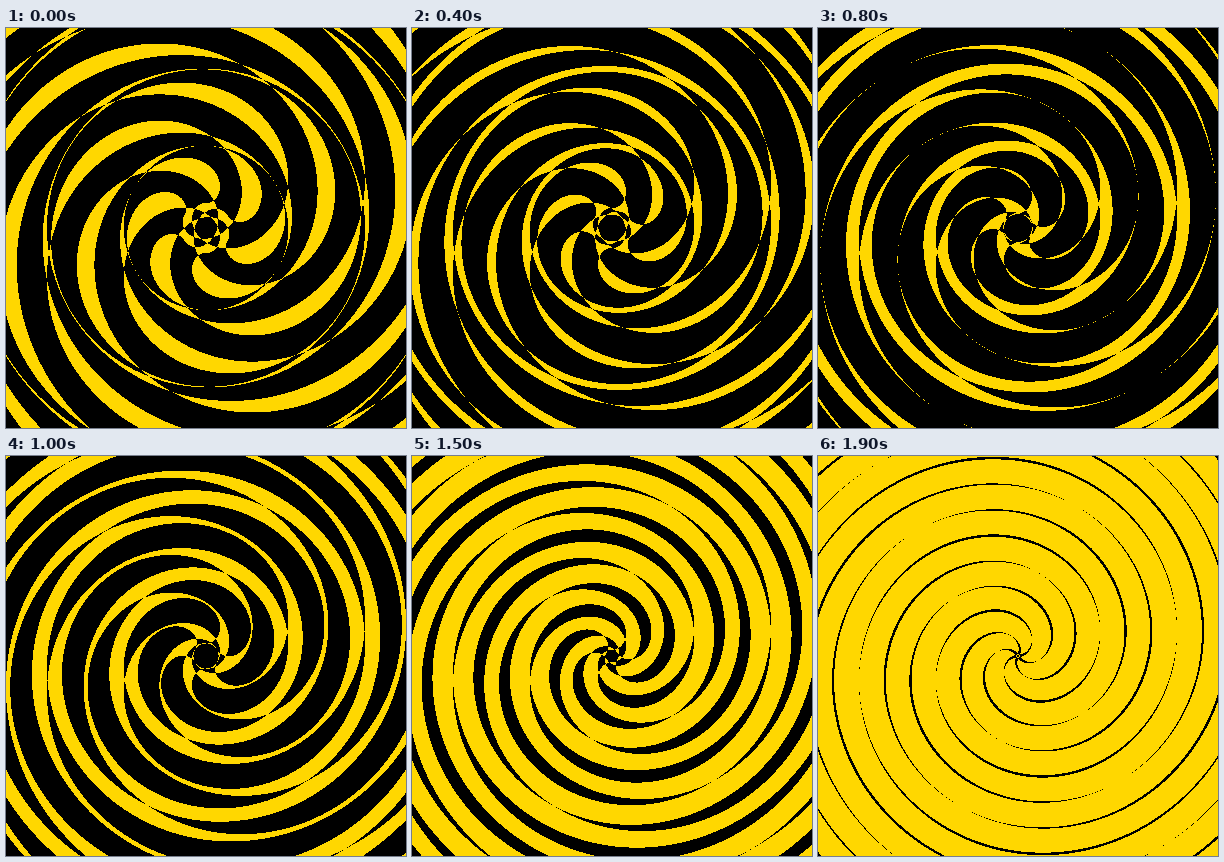
An HTML page with a canvas that plays this animation: 400 by 400 pixels, repeating every 2 s.

```html
<!DOCTYPE html>
<html lang="en">
<head>
<meta charset="utf-8">
<title>Spiral interference</title>
<style>
  html, body { margin: 0; width: 100%; height: 100%; overflow: hidden; background: #000; }
  canvas { display: block; width: 400px; height: 400px; }
</style>
</head>
<body>
<canvas id="stage" width="400" height="400"></canvas>
<script>
  const SIZE = 400, ARMS = 6, PITCH = 25;
  const STEPS = 20, STEP_MS = 100, MAX_SPREAD = 25;

  const ctx = document.getElementById('stage').getContext('2d');
  const image = ctx.createImageData(SIZE, SIZE);
  const pixels = new Uint32Array(image.data.buffer);
  const GOLD = 0xff00d7ff, BLACK = 0xff000000; // ABGR

  // Six two-tone Archimedean spirals on a hexagon, combined by exclusive or.
  function draw(step) {
    const spread = MAX_SPREAD * (1 - step / STEPS);
    const spirals = Array.from({ length: ARMS }, (_, k) => {
      const turn = k * 2 * Math.PI / ARMS;
      return { x: -spread * Math.sin(turn), y: spread * Math.cos(turn), turn };
    });
    let i = 0;
    for (let row = 0; row < SIZE; row++) {
      for (let col = 0; col < SIZE; col++) {
        const x = col + 0.5 - SIZE / 2, y = row + 0.5 - SIZE / 2;
        let odd = false;
        for (const s of spirals) {
          const u = x - s.x, v = y - s.y;
          const phase = Math.sqrt(u * u + v * v) / PITCH - s.turn;
          if (u * Math.sin(phase) + v * Math.cos(phase) < 0) odd = !odd;
        }
        pixels[i++] = odd ? GOLD : BLACK;
      }
    }
    ctx.putImageData(image, 0, 0);
  }

  let shown = -1;
  function tick() {
    const step = Math.floor(performance.now() / STEP_MS) % STEPS;
    if (step !== shown) draw(shown = step);
    requestAnimationFrame(tick);
  }
  tick();
</script>
</body>
</html>
```
